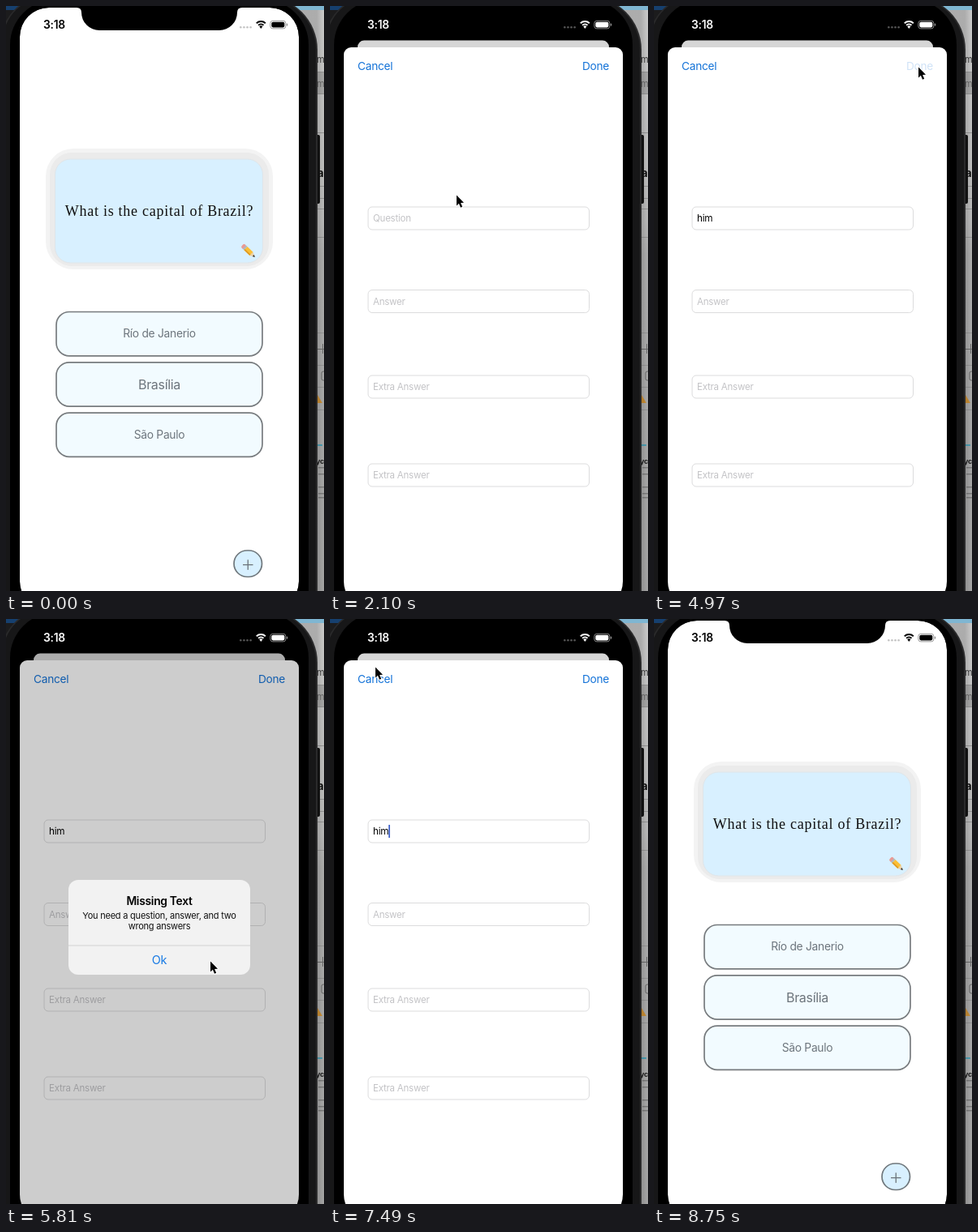
An HTML page with a canvas that plays this animation: 392x722 px, repeating every 9.31 s.

```html
<!DOCTYPE html>
<html lang="en">
<head>
<meta charset="utf-8">
<title>Flashcards</title>
<style>
html, body { margin: 0; width: 100%; height: 100%; overflow: hidden; background: #000; }
canvas { display: block; }
</style>
</head>
<body>
<canvas id="stage" width="392" height="722"></canvas>
<script>
const ctx = document.getElementById('stage').getContext('2d');
const LOOP = 9310, STEP = 70;
const SANS = 'Inter, "Liberation Sans", sans-serif';
const SERIF = '"Liberation Serif", "Noto Serif", serif';
const BLUE = '#1473d8';
const SCREEN = { x: 17, y: 2, w: 344, h: 744, r: 36 };

// Pointer path: time, x, y
const POINTER = [
  [630, 300, 712], [980, 306, 691], [1400, 310, 691], [1540, 300, 640],
  [2030, 156, 233], [2100, 156, 233], [2380, 110, 273], [2590, 80, 254],
  [3500, 80, 254], [3780, 148, 254], [3900, 148, 254], [4130, 345, 45],
  [4270, 326, 73], [4550, 326, 75], [5080, 326, 75], [5600, 253, 367],
  [5810, 252, 422], [6500, 252, 422], [7070, 150, 130], [7350, 60, 40],
  [7490, 56, 59], [7700, 52, 68], [8200, 52, 68], [8620, -14, -20]
];

const clamp = v => Math.max(0, Math.min(1, v));
const mix = (a, b, p) => a + (b - a) * p;
const ramp = (t, from, to) => clamp((t - from) / (to - from));
const ease = p => p * p * (3 - 2 * p);
const between = (t, a, b) => t >= a && t < b;

function spring(ms) {
  if (ms <= 0) return 0;
  const x = ms * 0.012;
  const p = 1 - (1 + x) * Math.exp(-x);
  return p > 0.995 ? 1 : p;
}

function path(x, y, w, h, r) {
  ctx.beginPath();
  ctx.roundRect(x, y, w, h, r);
}

function box(x, y, w, h, r, fill, stroke, line = 1) {
  path(x, y, w, h, r);
  if (fill) { ctx.fillStyle = fill; ctx.fill(); }
  if (stroke) { ctx.strokeStyle = stroke; ctx.lineWidth = line; ctx.stroke(); }
}

function rect(x, y, w, h, fill) {
  ctx.fillStyle = fill;
  ctx.fillRect(x, y, w, h);
}

// Draws text centred on y and returns its width
function label(s, x, y, size, color, { align = 'left', weight = 400, font = SANS, track = -0.02 } = {}) {
  ctx.font = `${weight} ${size}px ${font}`;
  ctx.letterSpacing = track * size + 'px';
  ctx.textAlign = align;
  ctx.fillStyle = color;
  ctx.fillText(s, x, y + size * 0.36);
  const { width } = ctx.measureText(s);
  ctx.letterSpacing = '0px';
  return width;
}

function poly(points, fill, stroke, line = 1) {
  ctx.beginPath();
  points.forEach(([x, y]) => ctx.lineTo(x, y));
  ctx.closePath();
  if (fill) { ctx.fillStyle = fill; ctx.fill(); }
  if (stroke) { ctx.strokeStyle = stroke; ctx.lineWidth = line; ctx.stroke(); }
}

function desktop() {
  rect(0, 0, 392, 722, '#1c1c1d');
  rect(0, 0, 60, 5, '#16406f');
  rect(300, 0, 92, 5, '#7fb6d2');
  const g = ctx.createLinearGradient(0, 5, 0, 722);
  g.addColorStop(0, '#e6e6e6');
  g.addColorStop(0.36, '#d2d2d2');
  g.addColorStop(0.42, '#c4c4c4');
  g.addColorStop(1, '#bcbcbc');
  rect(300, 5, 92, 717, g);
  rect(380, 82, 12, 26, '#bdbdbd');
  [81, 108, 156, 222, 237, 250, 285, 403, 443, 470, 498].forEach(y => rect(380, y, 12, 1, '#a8a8a8'));
  label('m', 383, 66, 11, '#444');
  label('m', 383, 96, 11, '#777');
  label('a', 384, 206, 13, '#111', { weight: 700 });
  rect(384, 423, 8, 1, '#777');
  rect(390, 417, 1, 12, '#777');
  box(389, 451, 12, 11, 2, null, '#777');
  poly([[384, 480], [390, 490], [378, 490]], '#e5a23c');
  rect(384, 541, 6, 2, '#56b4cc');
  label('ycl', 382, 562, 9, '#222', { weight: 700 });
  [569, 577, 593, 601, 606].forEach(y => rect(385, y, 7, 1.5, '#8d8d8d'));

  const shade = ctx.createLinearGradient(383, 0, 396, 0);
  shade.addColorStop(0, 'rgba(0,0,0,0.25)');
  shade.addColorStop(1, 'rgba(0,0,0,0.06)');
  rect(340, 5, 52, 717, shade);
}

function phone() {
  box(382, 159, 5, 85, 2, '#111');
  box(-6, -12, 390, 820, [56, 66, 60, 60], '#2a2a2b');
  box(-4, -11, 386, 818, [55, 65, 60, 60], '#171718');
  box(5, -8, 368, 812, 56, '#000');
}

function pencil(x, y) {
  ctx.save();
  ctx.translate(x, y);
  ctx.rotate(0.76);
  box(-10.5, -3, 4.5, 6, 2, '#ea9a94');
  rect(-7.2, -3, 2.4, 6, '#b3b8bd');
  rect(-4.8, -3, 9.6, 6, '#fbbf35');
  rect(-4.8, 1.2, 9.6, 1.8, '#e09a22');
  poly([[4.8, -3], [10.6, 0], [4.8, 3]], '#ecd0a4');
  poly([[8, -1.4], [11, 0], [8, 1.4]], '#333');
  ctx.restore();
}

function quiz(p, press) {
  const k = 1 - 0.099 * p;
  ctx.save();
  ctx.translate(189, 2 + 40.5 * p);
  ctx.scale(k, k);
  ctx.translate(-189, -2);
  path(SCREEN.x, SCREEN.y, SCREEN.w, SCREEN.h, mix(SCREEN.r, 9, p));
  ctx.clip();
  rect(0, 0, 392, 760, '#fff');

  const grow = 4 * Math.min(1, p * 7);
  box(49 - grow, 176 - grow, 280 + 2 * grow, 149 + 2 * grow, 34, '#f3f3f3');
  box(54 - grow / 2, 181 - grow / 2, 270 + grow, 140 + grow, 27, '#ebebeb');
  box(60.5, 189, 256, 128, 19, '#d8f0ff', '#dfe5e9');
  label('What is the capital of Brazil?', 189, 253, 18, '#111', { align: 'center', font: SERIF, track: 0.041 });
  pencil(299, 302.5);

  [['Río de Janerio', 13.8], ['Brasília', 16], ['São Paulo', 13.8]].forEach(([s, size], i) => {
    const y = 377.5 + i * 62.3;
    box(62, y, 254, 54.3, 16, '#f2fbff', '#777b7e', 1.7);
    label(s, 189, y + 27, size, '#6d757c', { align: 'center' });
  });

  box(281, 672, 34.5, 32.5, 16.2, '#d8f0ff', '#6f777c', 1.7);
  ctx.globalAlpha = 1 - 0.75 * press;
  rect(292, 689, 12.5, 1.3, '#6d757c');
  rect(297.6, 683.4, 1.3, 12.5, '#6d757c');
  ctx.globalAlpha = 1;
  rect(0, 0, 392, 760, `rgba(0,0,0,${0.16 * p * p})`);
  ctx.restore();
}

function link(s, x, align, press) {
  ctx.globalAlpha = 1 - 0.8 * press;
  label(s, x, 74, 13.7, BLUE, { align });
  ctx.globalAlpha = 1;
}

function sheet(t, p) {
  ctx.save();
  ctx.translate(0, 694 * (1 - p));
  box(17, 51, 344, 760, [9, 9, 0, 0], '#fff');
  link('Cancel', 34, 'left', ramp(t, 7770, 7840) - ramp(t, 7980, 8190));
  link('Done', 344, 'right', ramp(t, 4690, 4760) - ramp(t, 5010, 5200));

  const typed = 'him'.slice(0, Math.max(0, Math.floor((t - 2940) / STEP) + 1));
  let caretX = 53;
  [['Question', 262], ['Answer', 364.5], ['Extra Answer', 470], ['Extra Answer', 579]].forEach(([hint, y], i) => {
    box(47, y - 14, 272.5, 28, 5, '#fff', '#dcdcdd');
    if (i === 0 && typed) caretX += label(typed, 53, y, 11.7, '#000');
    else label(hint, 53, y, 11.5, '#c3c3c6');
  });

  const focused = between(t, 2590, 4690) || between(t, 6580, 8300);
  const lit = between(t, 2590, 3500) || (t - 3080) % 1000 < 520;
  if (focused && lit) rect(caretX, 254, 1.6, 16, '#2f55c6');
  ctx.restore();
}

function alertBox(t) {
  const show = ease(ramp(t, 5010, 5360));
  const hide = ease(ramp(t, 6230, 6580));
  const a = show - hide;
  if (a <= 0) return;
  rect(0, 0, 392, 722, `rgba(0,0,0,${0.195 * a})`);
  ctx.save();
  ctx.globalAlpha = a;
  const k = 1 + 0.18 * (1 - show);
  ctx.translate(189, 380.5);
  ctx.scale(k, k);
  ctx.translate(-189, -380.5);
  path(77, 322, 224, 117, 12);
  ctx.clip();
  rect(77, 322, 224, 117, '#f2f2f2');
  if (t >= 6090) rect(77, 403, 224, 36, '#e2e2e2');
  rect(77, 402.5, 224, 1, '#d3d3d3');
  label('Missing Text', 189, 348, 13.8, '#000', { align: 'center', weight: 600 });
  label('You need a question, answer, and two', 189, 366, 11, '#111', { align: 'center' });
  label('wrong answers', 189, 379, 11, '#111', { align: 'center' });
  label('Ok', 189, 421, 14.5, '#187ae4', { align: 'center' });
  ctx.restore();
}

function statusBar(light) {
  const ink = light ? '#fff' : '#000';
  const rim = light ? '#888' : '#999';
  label('3:18', 46, 23, 13.8, ink, { weight: 600 });
  for (let i = 0; i < 4; i++) box(288 + i * 4.1, 25, 2.6, 2.6, 1.3, light ? '#555' : '#c4c4c4');
  ctx.strokeStyle = ink;
  ctx.lineWidth = 2;
  [4.6, 8].forEach(r => {
    ctx.beginPath();
    ctx.arc(314.3, 27, r, -2.33, -0.81);
    ctx.stroke();
  });
  ctx.beginPath();
  ctx.moveTo(314.3, 28);
  ctx.arc(314.3, 27.4, 2.9, -2.33, -0.81);
  ctx.fillStyle = ink;
  ctx.fill();
  box(325.8, 18.3, 19, 9.6, 3, null, rim);
  box(327.3, 19.8, 16, 6.6, 1.8, ink);
  box(345.8, 21.5, 1.4, 3.2, 0.7, rim);
}

function notch() {
  ctx.beginPath();
  ctx.moveTo(87, 0);
  ctx.lineTo(87, 2);
  ctx.quadraticCurveTo(93, 2, 93, 8);
  ctx.arcTo(93, 30, 115, 30, 22);
  ctx.arcTo(285, 30, 285, 8, 22);
  ctx.quadraticCurveTo(285, 2, 291, 2);
  ctx.lineTo(291, 0);
  ctx.fillStyle = '#000';
  ctx.fill();
}

function pointer(t) {
  const last = POINTER[POINTER.length - 1];
  if (t < POINTER[0][0] || t > last[0] || between(t, 2940, 3500)) return;
  const i = Math.max(1, POINTER.findIndex(k => k[0] >= t));
  const [t0, x0, y0] = POINTER[i - 1], [t1, x1, y1] = POINTER[i];
  const p = ease(ramp(t, t0, t1));
  ctx.save();
  ctx.translate(mix(x0, x1, p), mix(y0, y1, p) + 0.5);
  ctx.lineJoin = 'round';
  const arrow = [[0, 0], [0, 13], [2.9, 10.3], [5, 15.2], [7.2, 14.3], [5.1, 9.5], [9, 9.2]];
  poly(arrow, null, '#fff', 2);
  poly(arrow, '#000');
  ctx.restore();
}

function draw(t) {
  const p = t < 8000 ? spring(t - 1347) : 1 - spring(t - 8120);
  desktop();
  phone();
  ctx.save();
  path(SCREEN.x, SCREEN.y, SCREEN.w, SCREEN.h, SCREEN.r);
  ctx.clip();
  quiz(p, ramp(t, 1120, 1190) - ramp(t, 1260, 1400));
  if (p > 0) sheet(t, p);
  alertBox(t);
  ctx.restore();
  notch();
  statusBar(p > 0.4);
  pointer(t);
}

function tick() {
  const t = performance.now() % LOOP;
  draw(Math.floor(t / STEP) * STEP);
  requestAnimationFrame(tick);
}
tick();
</script>
</body>
</html>
```
